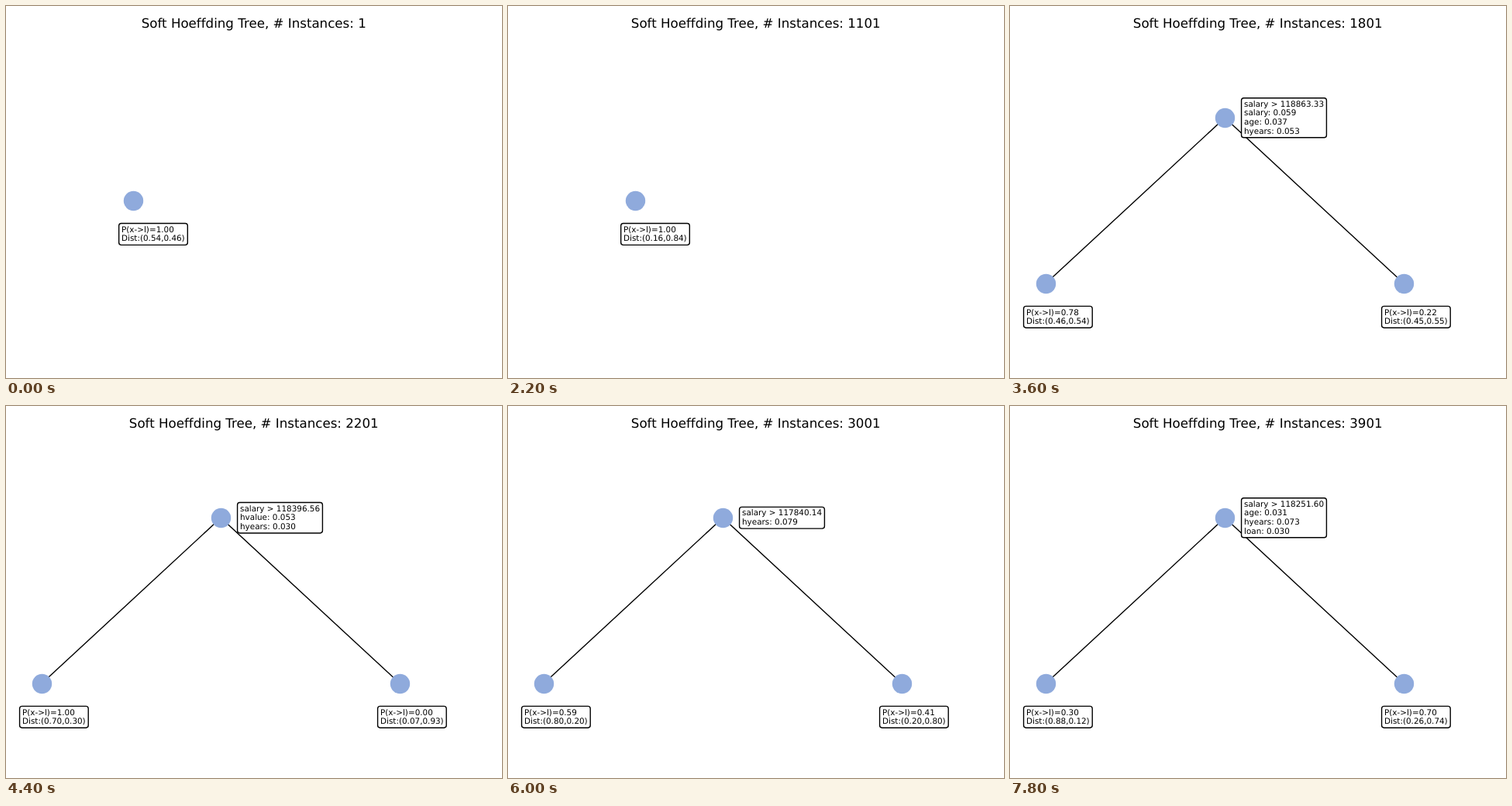
These frames come from a looping animation (640x480 px, 8 s). An HTML page:

```html
<!DOCTYPE html>
<html lang="en">
<head>
<meta charset="utf-8">
<title>Soft Hoeffding Tree</title>
<style>
  html, body { margin: 0; width: 100%; height: 100%; overflow: hidden; background: #fff; }
  svg { display: block; width: 640px; height: 480px; }
  text {
    font: 10.417px "DejaVu Sans", sans-serif;
    font-variant-ligatures: none;
    text-rendering: geometricPrecision;
    white-space: pre;
  }
  .title { font-size: 16.667px; text-anchor: middle; }
  circle { fill: #8faadc; }
  path, rect { stroke: #000; stroke-width: 1.39; }
  path { fill: none; }
  rect { fill: #fff; }
</style>
</head>
<body>
<svg id="stage" viewBox="0 0 640 480"></svg>
<script>
const STEP_MS = 200, STEPS = 40, SPLIT_STEP = 18;
const LINE = 11.6, PAD = 3.125, LEAF_WIDTH = 82.4, RULE_WIDTH = 103.6, LEAF_DROP = 43.2;
const ROOT = [277.2, 144.25], LEFT = [46.2, 358.1], RIGHT = [508.2, 358.1], LONE = [164.5, 251.2];

const stage = document.getElementById('stage');

// Key points after the split, joined by straight lines.
const KEY_STEPS = [SPLIT_STEP, 22, 27, 34, 39];
const track = (...values) => step => {
  const i = Math.max(1, KEY_STEPS.findIndex(k => k >= step));
  const from = KEY_STEPS[i - 1];
  return values[i - 1] + (values[i] - values[i - 1]) * (step - from) / (KEY_STEPS[i] - from);
};
const threshold = track(118863.33, 118396.56, 117742.41, 117970.44, 118251.60);
const leftShare = track(0.78, 1, 0.30, 0.97, 0.30);
const leftDist = track(0.46, 0.70, 0.88, 0.69, 0.88);
const rightDist = track(0.45, 0.07, 0.09, 0.34, 0.26);
const hyears = track(0.053, 0.030, 0.061, 0.103, 0.073);

// Other weights swell briefly and are listed only while large enough.
const pulse = (step, center, peak) => peak * Math.max(0, 1 - Math.abs(step - center) / 4);
const weights = step => Object.entries({
  salary: pulse(step, 18, 0.059),
  commission: pulse(step, 34, 0.029),
  age: pulse(step, 18, 0.037) + pulse(step, 39, 0.031),
  hvalue: pulse(step, 22, 0.053),
  hyears: hyears(step),
  loan: pulse(step, 39, 0.030)
}).filter(([, w]) => w > 0.025);

const text = (x, y, s, cls = '') =>
  `<text class="${cls}" x="${x}" y="${y}">${s.replace(/>/g, '&gt;')}</text>`;
const snap = v => Math.floor(v) + 0.5;
const node = ([x, y]) => `<circle cx="${snap(x)}" cy="${snap(y)}" r="12.7"/>`;

function label(x, centerY, textWidth, lines) {
  const height = 10 + (lines.length - 1) * LINE + 2 * PAD;
  const bottom = centerY + height / 2;
  const rows = lines.map((s, i) => {
    const baseline = bottom - PAD - 2 - (lines.length - 1 - i) * LINE;
    return text(Math.round(x), Math.round(baseline), s);
  });
  return `<rect x="${x - PAD}" y="${bottom - height}" width="${textWidth + 2 * PAD}" ` +
    `height="${height}" rx="${PAD}"/>` + rows.join('');
}

function leaf(pos, labelX, share, dist) {
  const first = Math.round(dist * 100) / 100;
  return node(pos) + label(labelX, pos[1] + LEAF_DROP, LEAF_WIDTH, [
    `P(x->l)=${share.toFixed(2)}`,
    `Dist:(${first.toFixed(2)},${(1 - first).toFixed(2)})`
  ]);
}

function singleLeaf(step) {
  const learned = Math.min(1, step / 11);
  return leaf(LONE, 148.8, 1, 0.54 - 0.38 * learned);
}

function splitTree(step) {
  const share = Math.round(leftShare(step) * 100) / 100;
  const lines = [
    `salary > ${threshold(step).toFixed(2)}`,
    ...weights(step).map(([name, w]) => `${name}: ${w.toFixed(3)}`)
  ];
  return `<path d="M${LEFT}L${ROOT}L${RIGHT}"/>` + node(ROOT) +
    label(301.7, ROOT[1], RULE_WIDTH, lines) +
    leaf(LEFT, 20.7, share, leftDist(step)) +
    leaf(RIGHT, 482.7, 1 - share, rightDist(step));
}

function draw(step) {
  stage.innerHTML =
    text(319.75, 28, `Soft Hoeffding Tree, # Instances: ${step * 100 + 1}`, 'title') +
    (step < SPLIT_STEP ? singleLeaf(step) : splitTree(step));
}

const start = performance.now();
let shown = -1;
function tick() {
  const step = Math.floor((performance.now() - start) / STEP_MS) % STEPS;
  if (step !== shown) draw(shown = step);
  requestAnimationFrame(tick);
}
tick();
</script>
</body>
</html>
```
